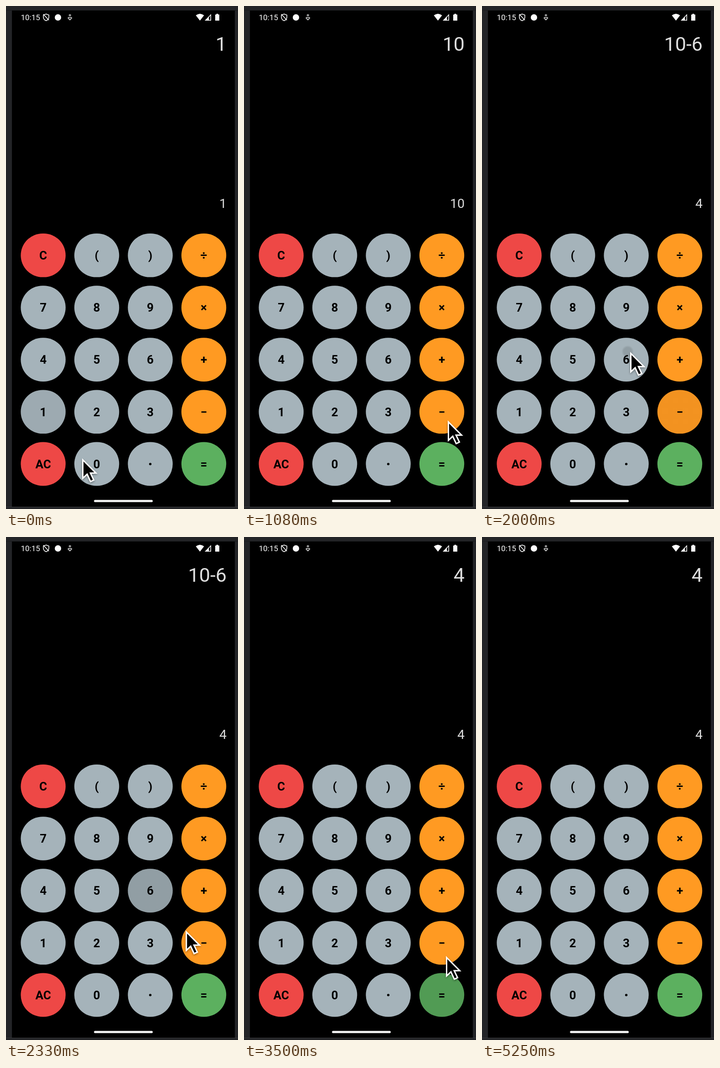
Write an HTML page that moves like this. It is 509x1101 px and loops after 5.33 s.

```html
<!DOCTYPE html>
<html lang="en">
<head>
<meta charset="utf-8">
<title>Calculator</title>
<style>
  html, body { margin: 0; width: 100%; height: 100%; overflow: hidden; background: #232427; }
  svg { display: block; width: 509px; height: 1101px; font-family: Roboto, Arial, sans-serif; }
  .key { font-size: 26px; font-weight: 700; text-anchor: middle; }
  .out { fill: #dedede; text-anchor: end; }
</style>
</head>
<body>
<svg viewBox="0 0 509 1101">
  <defs>
    <radialGradient id="ink">
      <stop offset=".65" stop-opacity="1"/>
      <stop offset="1" stop-opacity="0"/>
    </radialGradient>
    <filter id="shade" x="-40%" y="-40%" width="180%" height="180%">
      <feDropShadow dx="0" dy="2" stdDeviation="2" flood-opacity=".4"/>
    </filter>
  </defs>
  <rect width="509" height="1101" fill="#232427"/>
  <rect y="9" width="509" height="1" fill="#1a1b1d"/>
  <rect x="13" y="10" width="489" height="1086" fill="#000"/>
  <rect y="1096" width="509" height="1" fill="#3a3b3e"/>

  <g fill="#fff">
    <text x="32.5" y="30.5" font-size="17">10:15</text>
    <g fill="none" stroke="#fff" stroke-width="1.6">
      <path d="M88 17.5l6 2.3v4.5q0 5.5-6 8q-6-2.5-6-8v-4.5zM82 18l12 13"/>
      <circle cx="140.200" cy="20.200" r="1.700" stroke-width="1.200"/>
      <path d="M140.200 30.500l-4-4q0-3 4-.5q4-2.500 4 .5z" stroke-width="1.300"/>
    </g>
    <circle cx="114" cy="25" r="7"/>
    <path d="M416.500 20.500q9-7 18 0l-9 11.500z"/>
    <path d="M450 17.500v14.500h-14z M448.500 21v9.500h-3.500v-5.500z" fill-rule="evenodd"/>
    <path d="M461.500 17h4v1.800h2.500v13.200h-9v-13.200h2.500z"/>
    <rect x="193" y="1081" width="129" height="5" rx="2.500" fill="#ececec"/>
  </g>

  <text id="expr" class="out" x="484" y="98" font-size="43"></text>
  <text id="result" class="out" x="484" y="442" font-size="28.5"></text>
  <g id="pad"></g>
  <g id="cursor" filter="url(#shade)">
    <path d="M1.500 3.500V43.500L11 34.800L18.500 50.800L25.500 47.600L18.200 32.300H30.300Z" stroke="#fff" stroke-width="3"/>
  </g>
</svg>
<script>
const LOOP = 5330, STEP = 250 / 3, LAST = 63;
const $ = id => document.getElementById(id);
const clamp = v => Math.max(0, Math.min(1, v));
const mix = (a, b, k) => a + (b - a) * k;
const smooth = k => k * k * (3 - 2 * k);

function add(parent, tag, attrs, text = '') {
  const el = document.createElementNS('http://www.w3.org/2000/svg', tag);
  for (const name in attrs) el.setAttribute(name, attrs[name]);
  el.textContent = text;
  parent.append(el);
  return el;
}

// Keypad
const rows = ['C ( ) ÷', '7 8 9 ×', '4 5 6 +', '1 2 3 −', 'AC 0 . ='];
const keys = {};
const colour = (label, col) =>
  label === '=' ? '#5cb05f' : col === 3 ? '#ff9a22' : /C/.test(label) ? '#ee4846' : '#a5b3ba';

rows.forEach((row, r) => row.split(' ').forEach((label, c) => {
  const x = 81.6 + 117.47 * c, y = 545.8 + 114.15 * r;
  const shape = { x: x - 49.2, y: y - 47.8, width: 98.4, height: 95.6, rx: 47.8 };
  const clip = add($('pad'), 'clipPath', { id: `key${r}${c}` });
  add(clip, 'rect', shape);
  add($('pad'), 'rect', { ...shape, fill: colour(label, c) });
  const ink = add($('pad'), 'g', { 'clip-path': `url(#key${r}${c})` });
  if (label === '.') add($('pad'), 'circle', { cx: x, cy: y + .2, r: 2.7 });
  else add($('pad'), 'text', { class: 'key', x, y: y + 9.3 }, label);
  keys[label] = { x, y, ink };
}));

// Each press: key, start time, touch point
const presses = [
  ['1', -670, 75, 880],
  ['0', 240, 167, 990],
  ['−', 1330, 443, 895],
  ['6', 1950, 320, 754],
  ['=', 3070, 459, 990],
].map(([label, start, x, y]) => {
  const key = keys[label];
  return { key, start, x, y, dot: add(key.ink, 'circle', { fill: 'url(#ink)' }) };
});

// Display: time, expression, result
const displays = [
  [0, '1', '1'], [250, '10', '10'], [1330, '10-', '10'], [1910, '10-6', '4'], [3080, '4', '4'],
];

// Pointer: time, x, y
const path = [
  [0, 167, 990], [240, 167, 990], [500, 486, 822], [660, 498, 800], [820, 492, 825],
  [1080, 447, 907], [1330, 443, 895], [1500, 443, 895], [1900, 325, 757],
  [2170, 325, 757], [2500, 470, 975], [2670, 459, 990], [3200, 459, 990],
  [3450, 443, 917], [LOOP, 443, 917],
];
const HIDE = 4410;

function drawRipple({ key, start, x, y, dot }, t) {
  const age = t - start;
  const grow = clamp(age / 450);
  const fade = 1 - clamp((age - 450) / 375);
  dot.setAttribute('cx', mix(x, key.x, grow));
  dot.setAttribute('cy', mix(y, key.y, grow));
  dot.setAttribute('r', age < 0 ? 0 : mix(4, 90, grow));
  dot.setAttribute('opacity', .12 * fade);
}

function draw(t) {
  const [, expr, result] = displays.findLast(d => d[0] <= t);
  $('expr').textContent = expr;
  $('result').textContent = result;
  presses.forEach(p => drawRipple(p, t));

  const i = path.findLastIndex(p => p[0] <= t);
  const [t0, x0, y0] = path[i], [t1, x1, y1] = path[i + 1];
  const k = smooth((t - t0) / (t1 - t0));
  $('cursor').setAttribute('transform', `translate(${mix(x0, x1, k)} ${mix(y0, y1, k)})`);
  $('cursor').setAttribute('visibility', t < HIDE ? 'visible' : 'hidden');
}

// The picture holds at twelve steps a second, on 10 ms marks
const origin = performance.now();
function tick() {
  const t = (performance.now() - origin) % LOOP;
  const n = Math.min(LAST, Math.floor((t + 7) / STEP));
  draw(Math.floor(n * STEP / 10 + 1e-6) * 10);
  requestAnimationFrame(tick);
}
tick();
</script>
</body>
</html>
```
